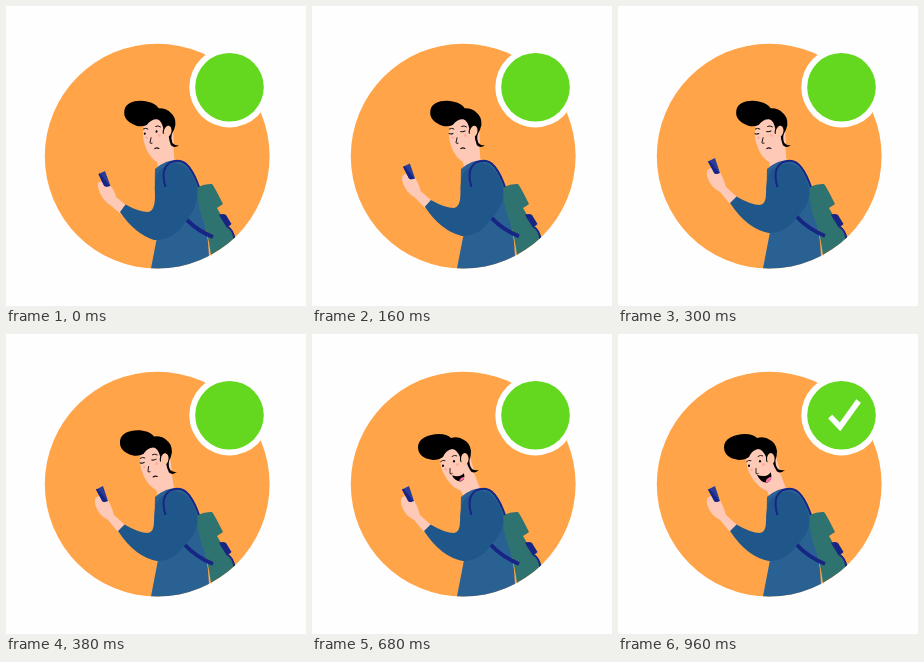
An HTML page that plays this animation: 300x300 px, repeating every 1210 ms.

```html
<!DOCTYPE html>
<html lang="en">
<head>
<meta charset="utf-8">
<title>Confirmed</title>
<style>
  html, body { margin: 0; width: 100%; height: 100%; overflow: hidden; background: #fefefe; }
  svg { display: block; width: 100vw; height: 100vh; }
  .skin { fill: #ffc9b7; }
  .navy { fill: #172584; }
  .line { fill: none; stroke: #111; stroke-width: 1.1; stroke-linecap: round; }
  .strap { fill: none; stroke: #172584; }
</style>
</head>
<body>
<svg viewBox="0 0 300 300">
  <defs>
    <clipPath id="disc"><circle cx="151.2" cy="150.2" r="112.4"/></clipPath>
  </defs>
  <circle cx="151.2" cy="150.2" r="112.4" fill="#ffa448"/>
  <g clip-path="url(#disc)">
    <path id="neck" class="skin"/>
    <!-- head, drawn in its bowed pose -->
    <g id="head">
      <path class="skin" d="M129 120 Q127 129 131 138 Q135 147 142 153 Q147 157 153 158 L162 137 L155 112 L138 112Z"/>
      <path d="M106 113 C106 105 116 100 127 100 Q135 100 139 104 Q147 102 152 106 Q158 109 159 117 Q159 122 157.5 126 Q157 131 160 135 Q163 137 167 136 Q163 140 159 137.5 Q156 133 154.5 128 L152 120 L150 128 Q147.5 129 148 123 Q144.5 115 140 115 Q134 116 131 123 Q127 126 121 126 Q106 124 106 113Z"/>
      <ellipse cx="152.8" cy="124.8" rx="3.8" ry="5.8" fill="#ffc7a8"/>
      <path class="line" d="M128.6 127.6 Q130.6 125.6 133 126.6 M140 122.4 Q142.2 120.6 144.8 121.8" style="stroke-width:.9"/>
      <g id="eyes">
        <ellipse cx="131" cy="131.8" rx="1" ry="1.2"/>
        <ellipse cx="142" cy="127.2" rx="1" ry="1.2"/>
      </g>
      <path id="lids" class="line" d="M129.3 132.2 Q131.2 132.6 133 131.2 M140.2 127.6 Q142.4 127.8 144.3 126.2"/>
      <g fill="#ffae9f">
        <circle cx="133.6" cy="135.4" r="1.3"/>
        <circle cx="145.6" cy="130.4" r="1.5"/>
      </g>
      <path class="line" d="M138 134.5 L138 139.6 Q139 140.4 140.2 139.6" style="stroke-width:.9"/>
      <path id="lips" class="line" d="M144 144.3 Q145.6 142.6 148 143.2"/>
      <g id="smile">
        <path d="M139 140.8 Q148 144.4 152.8 138.2 Q155 146.4 149 148.8 Q142.4 148.6 139 140.8Z"/>
        <path d="M147.6 148.9 Q147.6 144.8 152 143 Q153.8 142.8 153.2 144.6 Q152 148 147.6 148.9Z" fill="#ff6fa5"/>
      </g>
    </g>

    <!-- torso -->
    <path d="M149 163 Q153 159 160 156 Q174 151 183 160 Q190 167 193 184 L199 215 L202 236 L204 265 L144.5 265 L152 226 Q148 192 149 163Z" fill="#2a6193"/>

    <!-- backpack -->
    <path d="M192 181 Q199 177.5 206 178 Q208 180 217 198 L211 202 L215 209 L230 233 L205 249 Q202 226 196 211 Q190 194 192 181Z" fill="#2f7370"/>
    <path class="navy" d="M213 209 Q217 207 220 209 L225.5 218 L221 222Z"/>
    <path class="strap" stroke-width="2" d="M222 221 Q227 224 228.5 233"/>

    <path id="belt" class="strap" stroke-width="4"/>
    <path id="hand" class="skin"/>
    <path id="phone" fill="#2a3d96"/>
    <path id="side" class="navy"/>
    <path id="thumb" class="skin"/>
    <path id="arm" fill="#20578a"/>
    <path class="strap" stroke-width="2" d="M159.5 181 Q154 163 164 156.5 Q176 151.5 183 161 Q189 169 193 181"/>
  </g>

  <circle cx="223.5" cy="81.2" r="40.2" fill="#fefefe"/>
  <circle cx="223.5" cy="81.2" r="34.3" fill="#64d81e"/>
  <path id="tick" d="M212.2 82.6 L222 92.8 L240.6 67" pathLength="100" fill="none" stroke="#fff" stroke-width="5.6"/>
</svg>
<script>
const LOOP = 1210;
const el = id => document.getElementById(id);

// Pairs of matching paths: arm lowered, arm raised.
const poses = {
  hand: [
    "M92 181 Q91 175 96 176 L104 179 Q109 185 110 191 L121 200 L115 208 L104 199 Q95 193 92 181Z",
    "M89 170 Q88 163 93 162 L101 164 Q106 173 108 181 L119 191 L112 198 L102 186 Q92 181 89 170Z"
  ],
  phone: [
    "M92.5 168 L99 165 L104.5 180 L98.5 181Z",
    "M90 155.5 L97 152 L102 167 L97 168.5Z"
  ],
  side: [
    "M92.5 168 L94 167.4 L104 180 L98.5 181Z",
    "M90 155.5 L91.5 154.8 L101.5 167 L97 168.5Z"
  ],
  thumb: [
    "M93 177 Q95 174 98 180 L103 182 L106 187 L98 187Z",
    "M89 165 Q91 161 95 167 L100 169 L103 174 L95 176Z"
  ],
  arm: [
    "M119.5 198.5 Q133 206 142 206 Q149 205 149 190 Q148 172 152 166 Q157 160 170 157 Q186 160 191 183 Q193 200 180 215 Q168 235 148 234 Q129 228 114 206Z",
    "M118.5 190.5 Q133 199 142 199 Q148 198 148 188 Q148 172 152 166 Q157 160 170 157 Q186 160 191 183 Q193 198 178 212 Q168 227 151 227 Q129 223 112 197Z"
  ],
  belt: [
    "M181 214 Q192 225 207 231",
    "M178 210 Q190 223 207 230"
  ]
};
const necks = [
  "M149 146 L167 136 L169 160 L153 166Z",
  "M146 150 L161 136 L169 157 L153 166Z"
];

const mix = ([a, b], k) => {
  const to = b.match(/-?[\d.]+/g);
  let i = 0;
  return a.replace(/-?[\d.]+/g, n => (+n + (to[i++] - n) * k).toFixed(2));
};
const span = (t, from, to) => Math.min(1, Math.max(0, (t - from) / (to - from)));
const ease = k => (1 - Math.cos(Math.PI * k)) / 2;
const show = (id, on) => el(id).style.visibility = on ? "visible" : "hidden";

function draw(t) {
  const lift = ease(span(t, 10, 285));
  for (const id in poses) el(id).setAttribute("d", mix(poses[id], lift));

  const nod = ease(span(t, 290, 520));
  const up = 1 - nod;
  el("neck").setAttribute("d", mix(necks, nod));
  el("head").setAttribute("transform",
    `rotate(${12.6 * up} 160 152) translate(${3 * up} ${up})`);

  const shut = t >= 80 && t < 430;
  show("eyes", !shut);
  show("lids", shut);

  const grin = ease(span(t, 550, 740));
  show("lips", grin < 0.15);
  show("smile", grin >= 0.15);
  el("smile").setAttribute("transform",
    `translate(146 143) scale(${0.4 + 0.6 * grin} ${grin}) translate(-146 -143)`);

  const drawn = 100 * ease(span(t, 795, 960));
  show("tick", drawn > 0);
  el("tick").setAttribute("stroke-dasharray", `${drawn} 200`);
}

const start = performance.now();
function frame(now) {
  draw(Math.max(0, now - start) % LOOP);
  requestAnimationFrame(frame);
}
draw(0);
requestAnimationFrame(frame);
</script>
</body>
</html>
```
